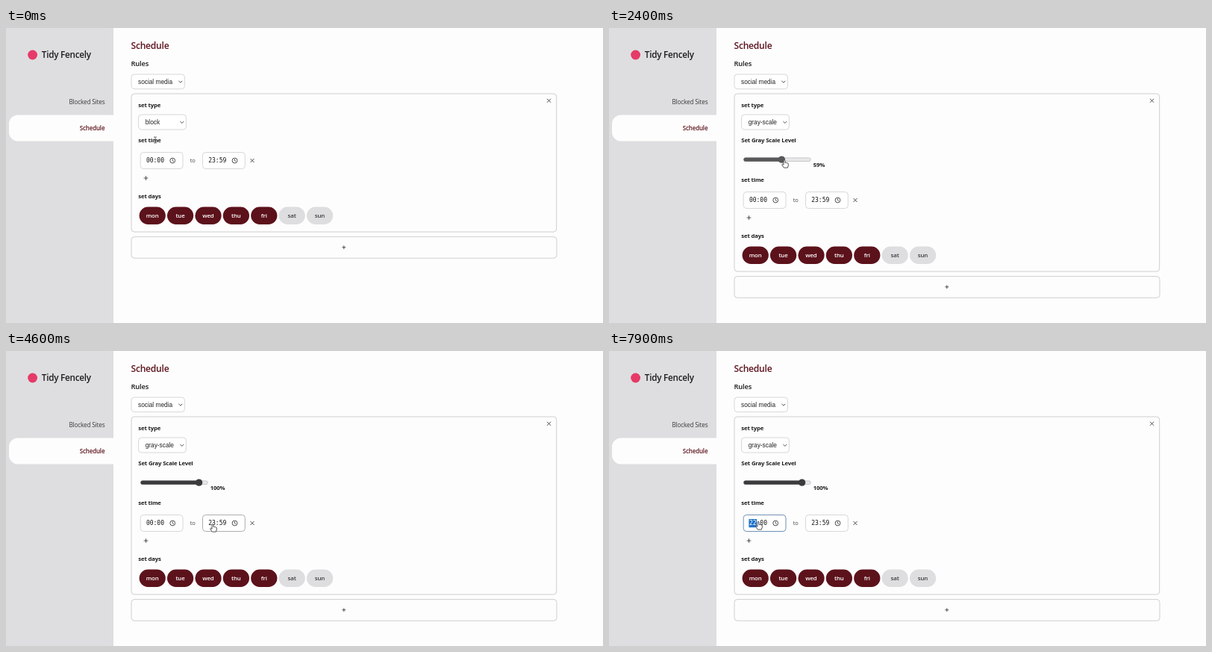
Recreate the animation shown at these times as an HTML page. Size 800 by 395 pixels, loop 8000 ms.

```html
<!DOCTYPE html>
<html lang="en">
<head>
<meta charset="utf-8">
<title>Schedule</title>
<style>
  html, body { margin: 0; width: 100%; height: 100%; overflow: hidden; background: #fdfdfd; }
  svg { display: block; width: 800px; height: 395px; }
  text { font-family: "Open Sans", "Noto Sans", sans-serif; letter-spacing: -.02em; fill: #1c1c1e; white-space: pre; }
  .title { font-size: 12.1px; font-weight: 600; fill: #5c121b; }
  .brand { font-size: 11.7px; font-weight: 600; }
  .rules { font-size: 9.4px; font-weight: 600; }
  .menu { font-size: 8.2px; fill: #3a3a3c; text-anchor: end; }
  .current { font-size: 8px; font-weight: 600; fill: #5c121b; }
  .label { font-size: 7.75px; font-weight: 700; }
  .small { font-size: 7.5px; fill: #444; }
  .day { font-size: 7.9px; font-weight: 600; text-anchor: middle; }
  .option { font: 8.3px "Liberation Sans", Arial, sans-serif; letter-spacing: 0; fill: #222; }
  .time { font: 8px "DejaVu Sans Mono", "Noto Sans Mono", monospace; letter-spacing: 0; fill: #111; }
  .box { fill: #fdfdfd; stroke: #cfcfd1; stroke-width: 1; }
  .field { fill: #fff; stroke: #d3d3d5; stroke-width: .9; }
  .icon { fill: none; stroke: #444; stroke-width: .95; }
</style>
</head>
<body>
<svg id="stage" viewBox="0 0 800 395"></svg>
<script>
const LOOP = 8000, STEP = 100, SHIFT = 53;
const EXPAND = 1000;
const stage = document.getElementById('stage');

// Keyframes: time, x, y of the pointer tip
const pointer = [
  [0, 200, 150], [200, 204, 144], [500, 210, 127], [700, 210, 128],
  [1000, 208, 152], [1300, 217.5, 173], [1700, 228, 176], [2000, 229, 176],
  [2400, 235, 176.5], [3100, 262, 177], [3400, 260, 178], [3800, 215.5, 232],
  [4100, 219, 232], [4600, 277, 231.5], [5200, 278, 231.5], [5900, 191, 227],
  [6500, 191, 227], [7300, 196, 228], [7900, 200, 228.5], [8000, 200, 228.5]
];
// Keyframes: time, slider percent
const level = [[0, 50], [2000, 50], [2400, 59], [3100, 100], [8000, 100]];
const hours = [[0, '00'], [6900, '02'], [7200, '22']];

function el(tag, attrs, parent = stage) {
  const node = document.createElementNS('http://www.w3.org/2000/svg', tag);
  for (const key in attrs) node.setAttribute(key, attrs[key]);
  parent.append(node);
  return node;
}

function set(node, attrs) {
  for (const key in attrs) node.setAttribute(key, attrs[key]);
}

function write(cls, x, y, words, parent) {
  const node = el('text', { class: cls, x, y }, parent);
  node.textContent = words;
  return node;
}

function rect(cls, x, y, width, height, rx, parent) {
  return el('rect', { class: cls, x, y, width, height, rx }, parent);
}

function icon(d, parent) {
  return el('path', { class: 'icon', d }, parent);
}

const cross = (x, y, r, parent) =>
  icon(`M${x - r} ${y - r}l${2 * r} ${2 * r}m0 ${-2 * r}l${-2 * r} ${2 * r}`, parent);
const plus = (x, y, r, parent) =>
  icon(`M${x - r} ${y}h${2 * r}M${x} ${y - r}v${2 * r}`, parent);

function select(x, y, width, height, textX, words) {
  const frame = rect('field', x, y, width, height, 4);
  const label = write('option', textX, y + height / 2 + 2.9, words);
  icon(`M${x + width - 8} ${y + height / 2 - 1}l2.4 2.4l2.4 -2.4`);
  return { frame, label };
}

function timeField(x, parent) {
  const frame = rect('field', x, 166.5, 56.8, 22, 4, parent);
  icon(`M${x + 39.6} 177.5a3.4 3.4 0 1 0 6.8 0a3.4 3.4 0 1 0 -6.8 0M${x + 43} 175.3v2.4l1.6 .9`, parent);
  return { frame, x };
}

// Sidebar
rect('', 0, 0, 144, 395, 0).setAttribute('fill', '#dedee0');
el('path', { d: 'M144 116.5H16a12 12 0 0 0 -12 12v11a12 12 0 0 0 12 12H144z', fill: '#fdfdfd' });
el('circle', { cx: 35.6, cy: 36, r: 6.4, fill: '#e63a68' });
write('brand', 47.8, 40.2, 'Tidy Fencely');
write('menu', 132.4, 102.3, 'Blocked Sites');
write('menu current', 132.4, 137.3, 'Schedule');

// Page
write('title', 167.5, 28.3, 'Schedule');
write('rules', 167.5, 50.9, 'Rules');
select(168, 62, 71.4, 19.6, 177, 'social media');
const card = rect('box', 168, 88, 569.7, 185, 4);
cross(727.5, 97.3, 2.5);
write('label', 177.3, 105.6, 'set type');
const type = select(177.6, 116, 63.8, 20, 186.7, 'block');

// Gray-scale section
const scale = el('g', {});
write('label', 177.3, 152.8, 'Set Gray Scale Level', scale);
set(rect('', 180.7, 173.9, 89.6, 4.6, 2.3, scale), { fill: '#e8e8ea', stroke: '#b4b4b6', 'stroke-width': .7 });
const fill = rect('', 180.4, 173.6, 45, 5.1, 2.5, scale);
const thumb = el('circle', { cy: 176.1, r: 4.7 }, scale);
const percent = write('label', 273.7, 186, '50%', scale);

// Lower part of the card, moved down by the section above
const lower = el('g', {});
write('label', 177.3, 152.8, 'set time', lower);
const start = timeField(180.2, lower);
const end = timeField(263.5, lower);
const mark = rect('', 187.4, 172, 10.6, 11.2, 0, lower);
const hour = write('time', 187.9, 180.4, '00', lower);
write('time', 197.5, 180.4, ':00', lower);
write('time', 271.2, 180.4, '23:59', lower);
write('small', 246.8, 180.2, 'to', lower);
cross(330, 177.5, 2.5, lower);
plus(187.5, 201, 2.8, lower);
write('label', 177.3, 227.6, 'set days', lower);
['mon', 'tue', 'wed', 'thu', 'fri', 'sat', 'sun'].forEach((name, i) => {
  const x = 178.6 + i * 37.4, on = i < 5;
  rect('', x, 239.6, 35.2, 23.4, 11.7, lower).setAttribute('fill', on ? '#5c121b' : '#dedee0');
  write('day', x + 17.5, 254.2, name, lower).style.fill = on ? '#fff' : '#3a3a3c';
});
rect('box', 168, 279.6, 570, 28.6, 4, lower);
plus(452.8, 293.7, 2.4, lower);

// Pointers, tip at the origin
const beam = el('path', {
  d: 'M-1.8 -4h1.4l.4 .4l.4 -.4h1.4M0 -3.6V3.6M-1.8 4h1.4l.4 -.4l.4 .4h1.4',
  fill: 'none', stroke: '#333', 'stroke-width': .8
});
const hand = el('path', {
  d: 'M-1 .8Q0 -.7 1 .8V4Q2 3.3 2.7 4.2Q3.7 3.6 4.2 4.6Q5.3 4.3 5.3 5.6V7.6L4.3 10.6H-.7L-3.1 7Q-3.5 5.6 -2.4 5.7L-1 6.8Z',
  fill: '#fff', stroke: '#2a2a2a', 'stroke-width': .8, 'stroke-linejoin': 'round'
});

function tween(keys, t) {
  let i = 1;
  while (i < keys.length - 1 && keys[i][0] <= t) i++;
  const a = keys[i - 1], b = keys[i];
  const p = Math.min(1, (t - a[0]) / (b[0] - a[0]));
  return a.slice(1).map((v, k) => v + (b[k + 1] - v) * p);
}

function latest(keys, t) {
  return keys.filter(key => key[0] <= t).pop()[1];
}

function draw(t) {
  const open = t >= EXPAND;
  const shift = open ? SHIFT : 0;
  const [x, y] = tween(pointer, t);
  const [value] = tween(level, t);
  const typing = t >= 6000;
  const dragging = t >= 1800 && t < 3200;
  const overSlider = open && x > 178 && x < 272 && y > 170 && y < 182;

  set(card, { height: 185 + shift });
  set(lower, { transform: `translate(0 ${shift})` });
  scale.style.display = open ? '' : 'none';
  type.label.textContent = open ? 'gray-scale' : 'block';
  const focused = t >= 500 && t < 1800;
  type.frame.style.stroke = focused ? '#6d9bd0' : '';
  type.frame.style.strokeWidth = focused ? 1.5 : '';

  const knob = 225.4 + (value - 50) * .664;
  const tone = dragging ? '#58585a' : '#3b3b3d';
  set(fill, { width: knob - 180.4, fill: overSlider && !dragging ? '#1d1d1f' : tone });
  set(thumb, { cx: knob, fill: tone });
  percent.textContent = Math.round(value) + '%';

  for (const field of [start, end]) {
    const over = open && x > field.x && x < field.x + 57 && y > 219 && y < 242;
    field.frame.style.stroke = typing && field === start ? '#6485aa' : over ? '#a4a4a6' : '';
  }
  set(mark, { fill: typing ? '#1f72c9' : 'none' });
  hour.textContent = latest(hours, t);
  hour.style.fill = typing ? '#fff' : '';

  const place = `translate(${x} ${y})`;
  set(beam, { transform: place, visibility: t < 300 ? 'visible' : 'hidden' });
  set(hand, { transform: place, visibility: t < 300 ? 'hidden' : 'visible' });
}

const origin = performance.now();
function tick() {
  const t = (performance.now() - origin) % LOOP;
  draw(Math.floor(t / STEP) * STEP);
  requestAnimationFrame(tick);
}
tick();
</script>
</body>
</html>
```
